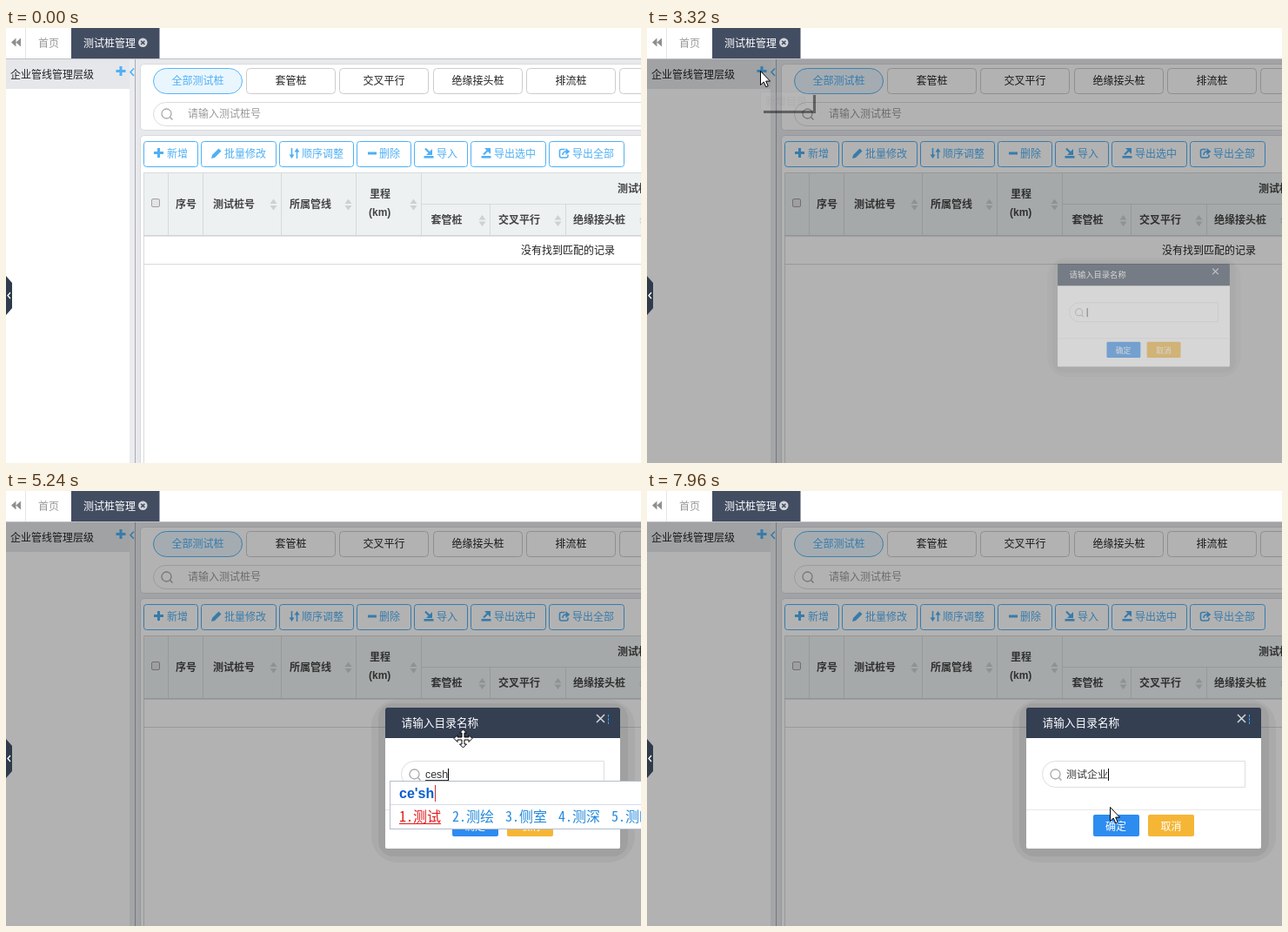
An HTML page for the animation above (8 s loop, 730 px wide and 500 px high).

```html
<!DOCTYPE html>
<html lang="zh">
<head>
<meta charset="utf-8">
<title>测试桩管理</title>
<style>
html, body { margin: 0; height: 100%; overflow: hidden; background: #fff; }
svg { display: block; width: 100vw; height: 100vh; }
text { font-family: "Noto Sans CJK SC", "Noto Sans CJK", sans-serif; white-space: pre; }
.latin { font-family: "Liberation Sans", Arial, sans-serif; }
.half { font-family: "Noto Sans Mono CJK SC", "Noto Sans CJK SC", monospace; }
</style>
</head>
<body>
<svg id="stage" viewBox="0 0 730 500" xmlns="http://www.w3.org/2000/svg"></svg>
<script>
const BLUE = '#4fb0f5', NAVY = '#343f52', LINE = '#d6dadd';

// y is the middle of the line of text
const text = (x, y, s, fill = '#222', size = 12, more = '') =>
  `<text x="${x}" y="${y + size * .38}" fill="${fill}" font-size="${size}" ${more}>${s}</text>`;
const mid = (x, y, s, fill, more = '') => text(x, y, s, fill, 12, `text-anchor="middle" ${more}`);
const rect = (x, y, w, h, fill, more = '') =>
  `<rect x="${x}" y="${y}" width="${w}" height="${h}" fill="${fill}" ${more}/>`;
const frame = (x, y, w, h, r, stroke, fill = '#fff') =>
  rect(x + .5, y + .5, w, h, fill, `rx="${r}" stroke="${stroke}"`);
const fill = (d, color, more = '') => `<path d="${d}" fill="${color}" ${more}/>`;
const line = (d, color, w = 1, more = '') =>
  `<path d="${d}" fill="none" stroke="${color}" stroke-width="${w}" ${more}/>`;
const group = (id, body, more = '') => `<g id="${id}" ${more}>${body}</g>`;
const plus = (x, y, color, id = '') => fill(
  `M${x - 1.5} ${y - 5.5}h3v4h4v3h-4v4h-3v-4h-4v-3h4z`, color, id && `id="${id}"`);
const lens = (x, y) => `<circle cx="${x}" cy="${y}" r="5.5" fill="none" stroke="#aaa" stroke-width="1.3"/>` +
  line(`M${x + 4} ${y + 4}l3 3`, '#aaa', 1.5);
const sorter = (x, y) => fill(`M${x - 4} ${y - 1}l4-5.5 4 5.5zM${x - 4} ${y + 1}l4 5.5 4-5.5z`, '#cdd1d4');

function topBar() {
  return rect(0, 0, 730, 36, '#fff') + rect(0, 35, 730, 1, '#bfbfc3') +
    fill('M11.5 11.5v10l-5.5-5zM17 11.5v10l-5.5-5z', '#8f8f8f') +
    rect(22, 0, 1, 35, '#e6e6e6') + text(37, 17, '首页', '#999') +
    rect(75, 0, 101.5, 35, '#434d62') + text(89, 17, '测试桩管理', '#fff') +
    '<circle cx="157.3" cy="16.8" r="5.2" fill="#d2d4d9"/>' +
    line('M155.2 14.7l4.2 4.2m0-4.2l-4.2 4.2', '#434d62', 1.5);
}

function sidebar() {
  return rect(0, 36, 142, 464, '#fff') + rect(0, 36, 142, 34, '#e5e7eb') +
    rect(142, 36, 6, 464, '#ebecef') + rect(148, 36, 1, 464, '#a9acb2') +
    text(5, 53, '企业管线管理层级', '#222') +
    plus(132, 49.5, BLUE, 'add') + line('M147 46.5l-4 4.2 4 4.2', BLUE, 1.6);
}

function filters() {
  const names = ['套管桩', '交叉平行', '绝缘接头桩', '排流桩', ''];
  return frame(154, 41, 620, 76, 4, LINE) +
    frame(169, 46, 102, 29, 15, '#58b5f3', '#eaf6fe') + mid(220.5, 60, '全部测试桩', BLUE) +
    names.map((s, i) => {
      const x = Math.round(276 + i * 107.3);
      return frame(x, 46, 102, 29, 4, '#ccc') + mid(x + 51.5, 60, s, '#222');
    }).join('') +
    frame(169, 85, 620, 27, 14, '#dcdcdc') + lens(184.5, 98.5) + text(209, 98, '请输入测试桩号', '#9a9a9a');
}

function toolbar() {
  const buttons = [[158, 62, 185, '新增'], [224, 86, 251, '批量修改'], [314, 85, 340, '顺序调整'],
    [403, 62, 429, '删除'], [469, 61, 495, '导入'], [534, 86, 561, '导出选中'], [624, 86, 651, '导出全部']];
  return buttons.map(([x, w, tx, s]) => frame(x, 130, w, 29, 3, BLUE) + text(tx, 144, s, BLUE)).join('') +
    plus(175.5, 143.5, BLUE) + rect(416, 142.5, 10, 3, BLUE) +
    fill('M236 150l1-4 7.5-7.5 3 3-7.5 7.5z', BLUE) +
    line('M328.5 138v9M334.5 141v9', BLUE, 1.6) +
    fill('M325.5 145.5h6l-3 4.5zM331.5 142.5h6l-3-4.5z', BLUE) +
    rect(480.5, 147, 11, 2.6, BLUE) + line('M482 138.5l5 5', BLUE, 2.2) + fill('M490 139v7h-7z', BLUE) +
    rect(546.5, 147, 11, 2.6, BLUE) + line('M549 145.5l5-5', BLUE, 2.2) + fill('M550 138h7v7z', BLUE) +
    line('M642.5 139.5h-4q-2 0-2 2v5.500q0 2 2 2h5.500q2 0 2-2v-1.500M640 146q0-4 4-4', BLUE, 1.6) +
    fill('M643.500 138l4.800 4-4.800 4z', BLUE);
}

function table() {
  const head = [[195, 202, '序号'], [238, 202, '测试桩号'], [326, 202, '所属管线'], [418, 190.5, '里程'],
    [703, 184, '测试桩'], [488.500, 220, '套管桩'], [566, 220, '交叉平行'], [652, 220, '绝缘接头桩']];
  const bold = 'font-weight="700"';
  return rect(158, 166, 580, 73, '#edf1f2') +
    line('M158.5 500V166.5H730M186.5 166v72M226.5 166v72M316.5 166v72M402.5 166v72M477.5 166v72' +
      'M477 202.5H730M556.5 203v35M643.5 203v35M158 271.5H730', LINE) +
    rect(158, 238, 580, 1.6, '#cfd3d6') +
    rect(167.5, 196.5, 9, 9, '#e4e4e4', 'rx="1.5" stroke="#a2a2a2"') +
    head.map(([x, y, s]) => text(x, y, s, '#444', 12, bold)).join('') +
    text(417, 211.5, '(km)', '#444', 12, bold + ' class="latin"') +
    [307.5, 393.5, 468.5].map(x => sorter(x, 203)).join('') +
    [547.5, 634.5, 732].map(x => sorter(x, 221.5)).join('') +
    text(592, 255, '没有找到匹配的记录', '#222');
}

function dialog() {
  return rect(420, 240, 303, 187, '#000', 'rx="30" opacity=".045"') +
    rect(428, 244, 287, 176, '#000', 'rx="17" opacity=".06"') +
    rect(436, 249, 270, 162, '#fff', 'rx="2"') +
    fill('M436 284v-33q0-2 2-2h266q2 0 2 2v33z', NAVY) +
    text(454.500, 266, '请输入目录名称', '#fff', 12.7) +
    line('M679 257l9 9m0-9l-9 9', '#d5d8dd', 1.5) +
    line('M692.5 257v11', '#3b9cf0', 1, 'id="focus" stroke-dasharray="3 1"') +
    line('M687.5 310.500H469.500a15 15 0 0 0 0 30H687.500z', '#dedede') + lens(469.5, 325.5) +
    rect(436, 366, 270, 1, '#e8e8e8') +
    rect(513, 372, 53, 25, '#2d8cf0', 'rx="2"') + mid(539, 385, '确定', '#fff') +
    rect(576, 372, 53, 25, '#f5b636', 'rx="2"') + mid(602.5, 385, '取消', '#fff') +
    text(482, 325, '', '#333', 12.4, 'id="typed" class="latin"') +
    rect(482, 332, 0, 1, '#333', 'id="under"') +
    rect(482, 319, 1, 14, '#000', 'id="caret"');
}

function cursors() {
  const pen = 'stroke="#000" stroke-linejoin="round"';
  return group('arrow', fill('M.5.5V16.5L4.200 13l2.600 5.700 2.400-1-2.500-5.600H11.500z', '#fff', pen)) +
    group('hand', fill('M5 14V2.5Q5 .5 6.500.5T8 2.500V8Q8 6.500 9.500 6.500T11 8.500Q11 7.500 12.300 7.500T13.700 9.500' +
      'Q14 8.700 15 8.700T16.500 10.500V15Q16.500 18 14.500 20V22H6.500V20Q4 17 .8 12.500Q.3 10.500 2 10.500T5 13', '#fff', pen) +
      line('M8 8v3.500M11 8.500v3M13.700 9.500v2.500', '#000')) +
    group('move', fill('M0-10.5L4-6.5H1.5V-1.5H6.5V-4L10.5 0 6.5 4V1.5H1.5V6.5H4L0 10.5-4 6.5H-1.5V1.5' +
      'H-6.5V4L-10.5 0-6.5-4V-1.5H-1.5V-6.5H-4Z', '#fff', pen));
}

const stage = document.getElementById('stage');
stage.innerHTML = rect(0, 0, 730, 500, '#e8e9ed') + topBar() + sidebar() + filters() +
  frame(154, 123, 620, 400, 4, LINE) + toolbar() + table() +
  rect(0, 36, 730, 464, '#000', 'id="shade" opacity=".3"') +
  fill('M0 285l7 8v29l-7 8z', '#2f3a4b') + line('M5 304l-3 3.500 3 3.500', '#fff', 1.3) +
  group('dialog', dialog()) +
  line('M192.5 77V96.5H134', '#000', 3, 'id="tipShadow"') +
  group('tip', frame(130, 73, 60, 21, 0, '#8a8a8a', '#f4f4f4') + text(136, 84, '新增目录', '#777')) +
  '<circle id="ring" cx="131.500" cy="51.500" r="10" fill="#fff" fill-opacity=".15" stroke="#000"/>' +
  group('ime', frame(441, 333, 320, 55, 0, '#b4bccb') + rect(442, 360, 300, 1, '#d5dbe6') +
    text(452, 347, '', '#0a5fcf', 16, 'id="pinyin" class="latin" font-weight="700"') +
    rect(537, 338, 1, 19, '#c8322b', 'id="imeCaret"') + group('words', '')) +
  cursors();

const el = id => document.getElementById(id);
const show = (id, on) => el(id).setAttribute('visibility', on ? 'visible' : 'hidden');
const set = (id, name, value) => el(id).setAttribute(name, value);

// each row starts with the time from which it holds
const path = [[0, 0, 0, ''], [710, 130, 415, 'arrow'], [830, 73, 241, 'arrow'], [980, 55, 152, 'arrow'],
  [1100, 82, 96, 'arrow'], [1220, 113, 62, 'arrow'], [1370, 121, 55, 'arrow'], [1490, 125, 52, 'hand'],
  [1610, 126, 50, 'hand'], [3320, 130, 49, 'arrow'], [3440, 222, 118, 'arrow'], [3600, 358, 212, 'arrow'],
  [3740, 438, 249, 'arrow'], [3860, 500, 276, 'move'], [3980, 525.5, 284.5, 'move'],
  [7570, 526, 291, 'arrow'], [7690, 526, 308, 'arrow'], [7840, 531, 342, 'arrow'], [7960, 532, 363, 'arrow']];
const tips = [[0, 0, 0], [2200, .6, .3], [2360, 1, .45], [3170, .9, .45], [3320, .06, .45], [3440, 0, 0]];
const popups = [[0, 0], [3320, .466], [3440, .93], [3600, 1]];
const carets = [[0, 1], [3740, 0], [4250, 1], [7290, 0], [7840, 1]];
const typing = [[0, '', ''],
  [4650, 'c', '测试 从 才 次 错'],
  [4810, 'ce', '测试 测 策 册 侧'],
  [5110, "ce's", '测试 测算 厕所 测速 侧身'],
  [5240, "ce'sh", '测试 测绘 侧室 测深 测时'],
  [5380, "ce'shi", '测试 侧视 测时 侧室 策士'],
  [5760, "ce'shi'q", '测试前 测试区 测试全 测试请'],
  [5900, "ce'shi'qi", '测试期 测试器 测试其 测试起'],
  [6180, "ce'shi'qi'y", '测试企业 测试器 测试期 测试其'],
  [6330, "ce'shi'qi'ye", '测试企业 测试器 测试期 测试其'],
  [6740, '', '']];
const at = (rows, t) => rows.filter(r => r[0] <= t).pop();

function candidates(list) {
  let x = 452;
  return list.split(' ').map((s, i) => {
    const color = i ? '#2489dc' : '#e01b1b', w = 16 + 16 * s.length;
    const item = text(x, 374, i + 1 + '.', color, 16, 'class="half"') + text(x + 16, 374, s, color, 16) +
      (i ? '' : rect(x, 382, w, 1, color));
    x += w + 13;
    return item;
  }).join('');
}

let shown = null;
function type(t) {
  const row = at(typing, t), [, pinyin, list] = row;
  if (row === shown) return;
  shown = row;
  const done = t >= 6740;
  el('typed').textContent = done ? '测试企业' : pinyin.replaceAll("'", '');
  set('typed', 'font-size', done ? 12 : 12.4);
  const w = el('typed').textContent ? el('typed').getComputedTextLength() : 0;
  set('under', 'width', pinyin ? w : 0);
  set('caret', 'x', Math.round(482 + w));
  show('ime', pinyin);
  el('pinyin').textContent = pinyin;
  set('imeCaret', 'x', Math.round(452.5 + (pinyin ? el('pinyin').getComputedTextLength() : 0)));
  el('words').innerHTML = pinyin ? candidates(list) : '';
}

function draw(t) {
  const [, x, y, kind] = at(path, t);
  for (const id of ['arrow', 'hand', 'move']) show(id, id === kind);
  if (kind) set(kind, 'transform', `translate(${x} ${y})`);

  set('add', 'fill', t >= 1490 && t < 3320 ? '#1f4263' : BLUE);
  show('ring', t >= 3170 && t < 3320);
  const [, face, shadow] = at(tips, t);
  set('tip', 'opacity', face);
  set('tipShadow', 'opacity', shadow);

  show('shade', t >= 3320);
  const p = at(popups, t)[1];
  set('dialog', 'opacity', p);
  set('dialog', 'transform', `translate(571 330) scale(${.5 + p / 2}) translate(-571 -330)`);
  set('focus', 'opacity', +(t >= 3600));
  set('caret', 'opacity', at(carets, t)[1]);
  type(t);
}

const start = performance.now();
function tick() {
  draw((performance.now() - start) % 8000);
  requestAnimationFrame(tick);
}
tick();
</script>
</body>
</html>
```
